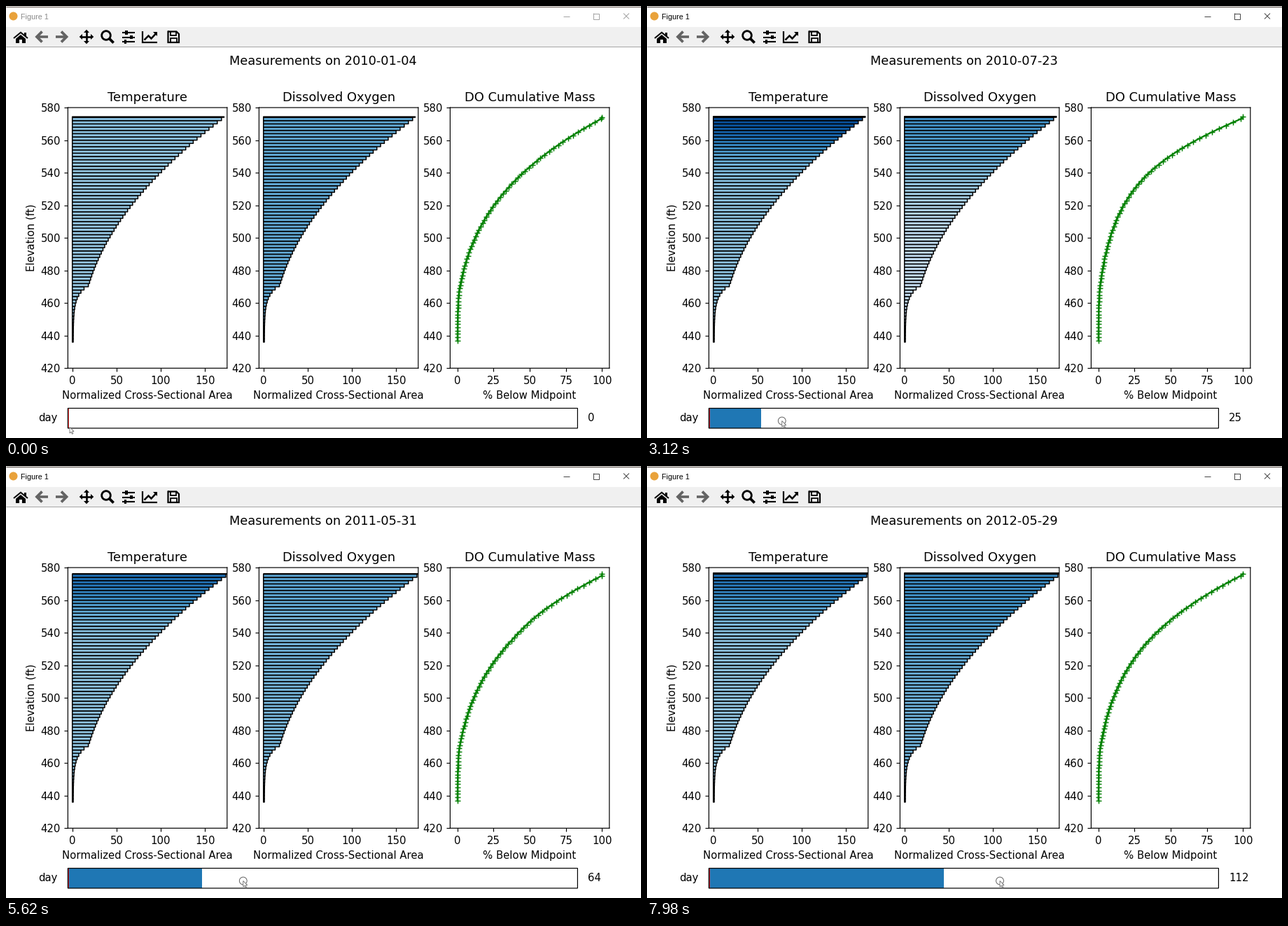
Animation, 907 px wide and 617 px high, one loop 8 s. Source, as a matplotlib script:

```python
import numpy as np
import matplotlib.pyplot as plt
from matplotlib.animation import FuncAnimation
from matplotlib.collections import PolyCollection
from matplotlib.patches import Circle, Polygon, Rectangle

W, H, DPI = 907, 617, 128
PX = 72 / DPI            # points per pixel
S = 107.2 / DPI          # scale of the default plot style
LOOP, FRAME = 8000, 40

plt.rcParams.update({
    "font.family": "DejaVu Sans", "font.size": 10 * S,
    "axes.linewidth": 0.8 * S, "axes.titlepad": 6 * S, "axes.labelpad": 4 * S,
    "lines.linewidth": 1.5 * S, "lines.markersize": 6 * S,
    "lines.markeredgewidth": S, "toolbar": "None",
})
for k in ("xtick", "ytick"):
    plt.rcParams.update({f"{k}.major.size": 3.5 * S, f"{k}.major.pad": 3.5 * S,
                         f"{k}.major.width": 0.8 * S})

fig = plt.figure(figsize=(W / DPI, H / DPI), dpi=DPI, facecolor="white")
win = fig.add_axes([0, 0, 1, 1], zorder=-1)
win.set(xlim=(0, W), ylim=(H, 0))
win.axis("off")


# ---- drawing helpers in window pixels ----
def rect(x, y, w, h, color, edge="none", lw=0, z=1):
    return win.add_patch(Rectangle((x, y), w, h, fc=color, ec=edge,
                                   lw=lw * PX, zorder=z))


def path(pts, color="black", lw=1.0, z=2):
    x, y = zip(*pts)
    return win.plot(x, y, color=color, lw=lw * PX, zorder=z,
                    solid_capstyle="butt", solid_joinstyle="miter")[0]


def poly(pts, color="black"):
    return win.add_patch(Polygon(pts, fc=color, ec="none", zorder=2))


def ring_at(x, y, r, color, lw, z=2):
    return win.add_patch(Circle((x, y), r, fc="none", ec=color, lw=lw * PX,
                                zorder=z))


def label(x, y, s, size, **kw):
    return win.text(x, y, s, fontsize=size * PX, **kw)


# ---- window frame ----
rect(0, 30, W, 28, "#f0f0f0")
path([(0, 57.5), (W, 57.5)], "#a6a6a6")
path([(906.5, 0), (906.5, 609)], "#8c8c8c")
top_edge = path([(0, 0.5), (W, 0.5)])
win.add_patch(Circle((10.5, 14.5), 6, fc="#e9a23b", ec="none"))
caption = label(21, 19, "Figure 1", 10.8, family="Liberation Sans")
buttons = [
    path([(796, 15), (804.5, 15)], lw=0.9),
    path([(839, 10.5), (847, 10.5), (847, 18.5), (839, 18.5), (839, 10)],
         lw=0.9),
    path([(882, 10.5), (890, 18.5)], lw=0.9),
    path([(882, 18.5), (890, 10.5)], lw=0.9),
]


# ---- toolbar icons ----
def home():
    path([(11, 46), (21, 37.8), (31, 46)], lw=2)
    rect(26, 38, 2.6, 5, "black")
    poly([(14, 46.8), (21, 41), (28, 46.8), (28, 53), (23, 53), (23, 48),
          (19, 48), (19, 53), (14, 53)])


def arrow(x, d):
    grey = "#636363"
    path([(x + 9 * d, 44), (x - 7 * d, 44)], grey, 3.6)
    path([(x + 0.5 * d, 36.5), (x - 7 * d, 44), (x + 0.5 * d, 51.5)], grey, 3.8)


def move(x, y):
    for dx, dy in ((1, 0), (-1, 0), (0, 1), (0, -1)):
        path([(x, y), (x + 7 * dx, y + 7 * dy)], lw=2.6)
        bx, by = x + 6 * dx, y + 6 * dy
        poly([(x + 10.3 * dx, y + 10.3 * dy), (bx + 4 * dy, by + 4 * dx),
              (bx - 4 * dy, by - 4 * dx)])


def lens():
    ring_at(143, 42, 6.3, "black", 2.8)
    path([(147.2, 46.2), (153.6, 52.6)], lw=3.8)


def sliders():
    for y, x in ((38, 172), (44.5, 179), (51, 170.5)):
        path([(165.5, y), (184, y)], lw=2.1)
        rect(x - 1.7, y - 2.7, 3.4, 5.4, "black")


def chart():
    path([(194.8, 36), (194.8, 52.3), (216, 52.3)], lw=2.2)
    path([(197.5, 48.5), (203.5, 42.5), (207.5, 46.5), (214, 39.5)], lw=2.5)
    poly([(209.5, 37), (215.5, 37), (215.5, 43)])


def disk():
    path([(231.5, 36.5), (243.5, 36.5), (247, 40), (247, 52), (231.5, 52),
          (231.5, 35.5)], lw=2.2)
    path([(235, 37), (235, 42), (242.5, 42), (242.5, 37)], lw=1.8)
    path([(234.5, 52), (234.5, 46.3), (244, 46.3), (244, 52)], lw=1.8)


home()
arrow(51, 1)
arrow(79.5, -1)
move(115, 44)
lens()
sliders()
chart()
disk()

# ---- plots ----
heading = label(452.5, 84, "", 17.8, ha="center")


def plot_axes(col, title, xlabel, xlim, tick):
    ax = fig.add_axes([(88.4 + 273 * col) / W, 1 - 517.3 / H,
                       227.4 / W, 372.2 / H])
    ax.set(xlim=xlim, ylim=(420, 580), xticks=np.arange(0, xlim[1], tick),
           yticks=range(420, 581, 20))
    ax.set_title(title)
    ax.set_xlabel(xlabel)
    for spine in ax.spines.values():
        spine.set_snap(False)
    return ax


def bars(ax):
    return ax.add_collection(PolyCollection([], edgecolors="black",
                                            linewidths=S, snap=False),
                             autolim=False)


SECTION = "Normalized Cross-Sectional Area"
ax_t = plot_axes(0, "Temperature", SECTION, (-5, 175), 50)
ax_o = plot_axes(1, "Dissolved Oxygen", SECTION, (-5, 175), 50)
ax_m = plot_axes(2, "DO Cumulative Mass", "% Below Midpoint", (-5, 105), 25)
ax_t.set_ylabel("Elevation (ft)")
temp_bars, oxy_bars = bars(ax_t), bars(ax_o)
mass_line, = ax_m.plot([], [], "+-", color="green")

# ---- slider and pointer ----
fill = rect(88.4, 574.5, 0, 28.5, "#1f77b4", z=2)
path([(88.9, 574.5), (88.9, 603)], "red", 1.5, z=3)
rect(88.4, 574.5, 728, 28.5, "none", "black", 1.2, z=4).set_snap(False)
label(73.8, 588.5, "day", 14.9, ha="right", va="center")
value = label(831, 588.5, "", 14.9, va="center")
ring = ring_at(0, 0, 5.4, "#555555", 0.9, z=6)
ARROW = np.array([(0, 0), (0, 8.6), (2, 6.8), (3.4, 9.8), (4.8, 9.2),
                  (3.5, 6.3), (6, 6.1)])
pointer = win.add_patch(Polygon(ARROW, fc="white", ec="#666666",
                                lw=0.8 * PX, zorder=7))

# ---- motion: even steps of the drag between a few key points ----
PRESS = 710
STEPS = np.linspace(PRESS, 7980, 55)
START = np.datetime64("2010-01-04")

# time, day, days since start, pointer x, surface, deep DO, top DO, DO dip
KEYS = np.array([
    (PRESS, 0, 0, 91, 574.4, .53, .54, 0),
    (1140, 1, 7, 105, 575.0, .53, .57, 0),
    (2460, 14, 119, 157.5, 576.2, .26, .70, 0),
    (3870, 36, 280, 228, 573.0, .27, .62, .07),
    (4680, 48, 385, 280, 576.8, .57, .71, 0),
    (6620, 80, 640, 397.5, 575.4, .37, .41, .38),
    (7980, 112, 876, 504, 576.7, .49, .66, 0)])


def step_at(t):
    return np.searchsorted(STEPS, t, side="right") - 1


KEY_STEPS = step_at(KEYS[:, 0] + 10)
BLUES = plt.get_cmap("Blues")


def rise(z, centre, width):
    return 1 / (1 + np.exp(-(z - centre) / width))


def cross_section(z):
    """Basin area: an exponential toe below a quadratic flank."""
    d = z - 480
    return np.minimum(1 + 6.3 * np.exp((z - 465) / 6),
                      24 + 0.70 * d + 0.0092 * d ** 2)


def temperature(z, date):
    """Uniform in winter, warm on top in summer, mixed deeper in autumn."""
    summer = 0.5 + 0.5 * np.cos(2 * np.pi * (date - 217) / 365.25)
    return 0.4 + 0.02 * summer + 0.52 * summer * rise(z, 558 - 16 * autumn(date),
                                                      6.5)


def oxygen(z, date, deep, top, dip):
    a = autumn(date)
    low = deep - dip * np.exp(-((z - 546) / 7) ** 2 / 2)
    return np.clip(low + (top - low) * rise(z, 540 + 12 * a, 13 - 12.4 * a),
                   0, 1)


def autumn(date):
    return np.exp(-((date - 283) / 45) ** 2)


def show_lake(days, surface, deep, top, dip):
    date = (days + 4) % 365.25
    lo = np.arange(436, surface, 2.0)
    hi = np.minimum(lo + 2, surface)
    mid = (lo + hi) / 2
    area = cross_section(mid)
    temp = temperature(mid, date)
    oxy = oxygen(mid, date, deep, top, dip)

    zero = np.zeros_like(lo)
    boxes = np.stack([np.column_stack(c) for c in
                      ((zero, lo), (area, lo), (area, hi), (zero, hi))], axis=1)
    for coll, level in ((temp_bars, temp), (oxy_bars, oxy)):
        coll.set_verts(boxes)
        coll.set_facecolor(BLUES(level))
    mass = np.cumsum(oxy ** 0.8 * area * (hi - lo))
    mass_line.set_data(100 * mass / mass[-1], mid)
    heading.set_text(f"Measurements on {START + int(round(days))}")


def draw(i):
    t = i * FRAME + 30
    day, days, x, *lake = (np.interp(step_at(t), KEY_STEPS, col)
                           for col in KEYS[:, 1:].T)
    show_lake(days, *lake)
    day = int(round(day))
    fill.set_width(3 * day)
    value.set_text(str(day))

    # before the press the pointer rises onto the slider in two hops
    hops = (t >= 150) + (t >= 290)
    y = 601.5 - 4.5 * hops
    active = t >= PRESS
    caption.set_color("black" if active else "#8a8a8a")
    for b in buttons:
        b.set_color("#333333" if active else "#999999")
    top_edge.set_color("#40362f" if active else "#5e5048")
    ring.set_visible(active)
    ring.set_center((x, y))
    pointer.set_xy(ARROW + (x, y))
    return []


anim = FuncAnimation(fig, draw, frames=LOOP // FRAME,
                     init_func=lambda: draw(0), interval=FRAME,
                     repeat=True, repeat_delay=0)
plt.show()
```
